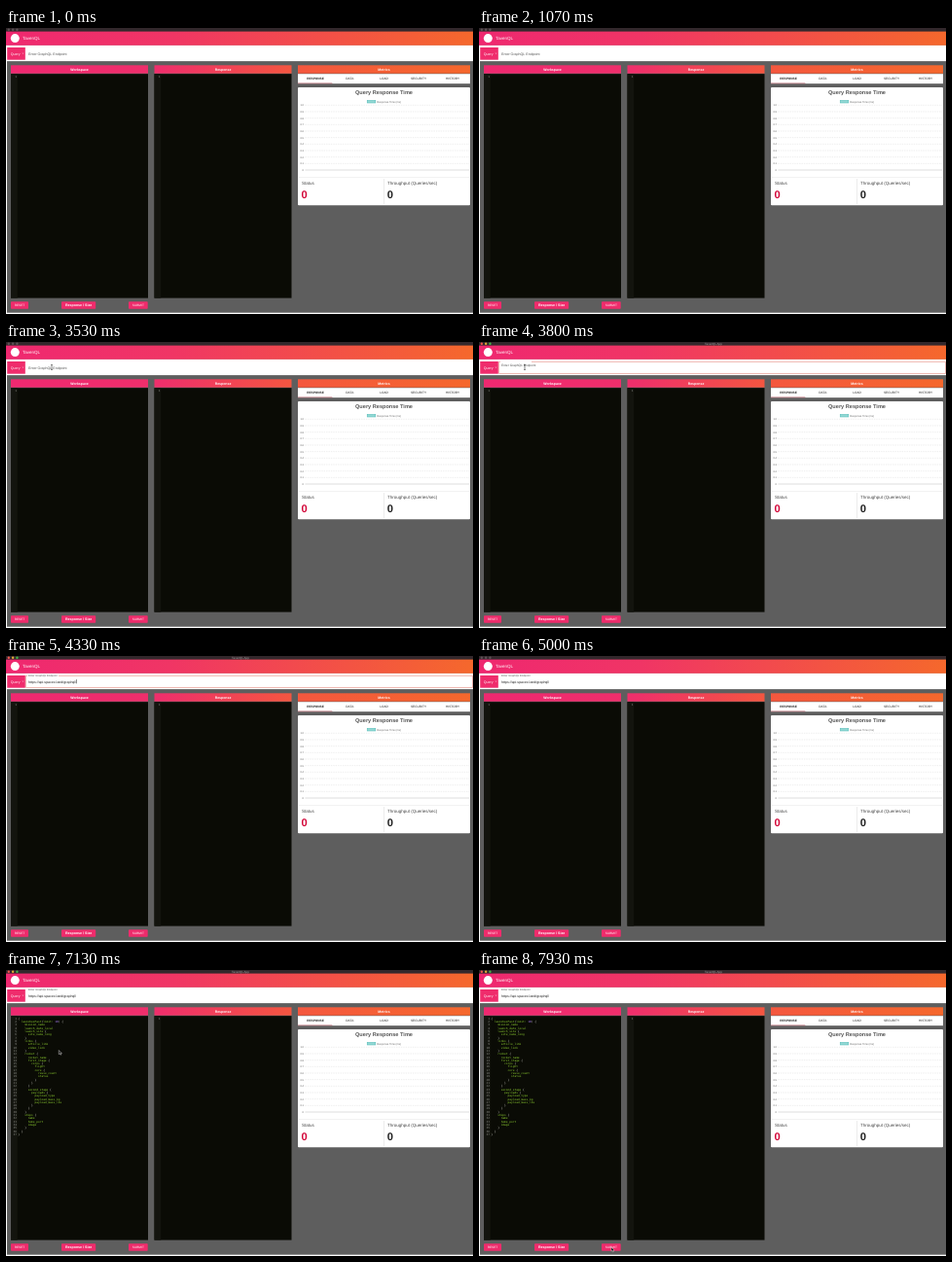
Animation of 480x294 px, one loop 8 s. Source, as an HTML page:

```html
<!DOCTYPE html>
<html lang="en">
<head>
<meta charset="utf-8">
<title>GraphQL client</title>
<style>
  html, body { margin: 0; height: 100%; overflow: hidden; background: #5e5e5e; }
  svg { display: block; width: 100vw; height: 100vh; }
  text { font-family: "Liberation Sans", Arial, sans-serif; text-rendering: geometricPrecision; }
  .mono text { font-family: "DejaVu Sans Mono", monospace; font-size: 2.87px; white-space: pre; }
</style>
</head>
<body>
<svg id="stage" viewBox="0 0 480 294">
  <defs>
    <linearGradient id="brand" gradientUnits="userSpaceOnUse" x1="0" y1="0" x2="480" y2="0">
      <stop offset="0" stop-color="#ef2870"/>
      <stop offset=".35" stop-color="#f03565"/>
      <stop offset="1" stop-color="#f5682c"/>
    </linearGradient>
    <linearGradient id="panels" gradientUnits="userSpaceOnUse" x1="0" y1="0" x2="480" y2="0">
      <stop offset="0" stop-color="#ef2870"/>
      <stop offset=".33" stop-color="#ef2f6b"/>
      <stop offset=".62" stop-color="#f4573f"/>
      <stop offset="1" stop-color="#f5682c"/>
    </linearGradient>
    <clipPath id="field"><rect x="20" y="19" width="460" height="15"/></clipPath>
  </defs>
  <g id="page"></g>
  <g clip-path="url(#field)">
    <path id="outline" d="M54 20.4H479.5V32.5H20.5V20.4H22" fill="none" stroke="#e58a80" stroke-width=".6"/>
    <text id="label" fill="#555" font-size="3.6">Enter GraphQL Endpoint</text>
    <text id="url" x="23" y="27.5" fill="#222" font-size="3.55">https://api.spacex.land/graphql/</text>
    <rect id="caret" x="72.4" y="24.1" width=".5" height="4.2" fill="#222"/>
  </g>
  <g id="code" class="mono"></g>
  <g id="lights"></g>
  <text id="title" x="241" y="2.7" font-size="3" fill="#a9a2a4" text-anchor="middle">TavenQL App</text>
  <g id="pointer">
    <path id="arrow" d="M0 0V4.2L1 3.3L1.7 4.8L2.4 4.5L1.8 3.1H3.1Z" fill="#111" stroke="#ddd" stroke-width=".45"/>
    <path id="beam" d="M-1 -2.6Q0 -2.6 0 -2V2Q0 2.6 -1 2.6M1 -2.6Q0 -2.6 0 -2M0 2Q0 2.6 1 2.6" fill="none" stroke="#222" stroke-width=".55"/>
  </g>
</svg>
<script>
const $ = id => document.getElementById(id);
const BRAND = 'url(#brand)', PANELS = 'url(#panels)', PINK = '#ef2c6c';

const rect = (x, y, w, h, fill, r = 0) =>
  `<rect x="${x}" y="${y}" width="${w}" height="${h}" rx="${r}" fill="${fill}"/>`;
const text = (str, x, y, size, fill, anchor = 'start', weight = 400) =>
  `<text x="${x}" y="${y}" font-size="${size}" fill="${fill}" text-anchor="${anchor}" font-weight="${weight}">${str}</text>`;
const button = (str, x, w, size, weight) =>
  rect(x, 281.2, w, 7.5, PINK, 0.8) + text(str, x + w / 2, 285 + size * 0.36, size, '#fff', 'middle', weight);
const heading = (str, x, w) =>
  rect(x, 38.3, w, 8.4, PANELS) + text(str, x + w / 2, 43.8, 3.5, '#fff', 'middle', 700);
const lineNumber = (n, x, y) => text(n, x, y, 2.87, '#8f908a', 'end');

function editor(title, x) {
  return heading(title, x, 141) + rect(x, 47.2, 141, 230.4, '#0a0b05') + rect(x, 47.2, 6.7, 230.4, '#13140e') +
    `<g class="mono">${lineNumber(1, x + 5.9, 50.8)}</g>`;
}

function metrics() {
  const tabs = [['RESPONSE', 318], ['DATA', 353.3], ['LOAD', 388.5], ['SECURITY', 424], ['HISTORY', 459]];
  let out = heading('Metrics', 300, 177) + rect(300, 47.2, 177, 10, '#fff') + rect(300, 56.6, 35.4, 0.6, '#a5424f');
  tabs.forEach(([name, x], i) => {
    out += text(name, x, 53.4, 3.2, '#222', 'middle', i ? 400 : 700);
  });
  out += rect(300, 61, 177, 121.2, '#fff', 1);
  out += text('Query Response Time', 388.5, 68.4, 5.6, '#555', 'middle', 700);
  out += `<rect x="371.2" y="74.4" width="8.6" height="2.6" fill="#93d8d4" stroke="#4bb8b4" stroke-width=".5"/>`;
  out += text('Response Time (ms)', 381.2, 76.7, 2.7, '#666');
  for (let i = 0; i <= 10; i++) {
    const y = 79.3 + i * 6.67;
    const tick = i === 10 ? '0' : (1 - i / 10).toFixed(1);
    out += text(tick, 306, y + 0.9, 2.6, '#555', 'end');
    out += `<path d="M307.5 ${y}H476" stroke="${i === 10 ? '#bbb' : '#ddd'}" stroke-width=".5" stroke-dasharray="${i === 10 ? 'none' : '1.4 1'}"/>`;
  }
  out += rect(301, 153.6, 175, 0.4, '#ddd') + rect(388.3, 155, 0.4, 26, '#ccc');
  out += text('Status', 304, 161.3, 4.5, '#444') + text('0', 303.6, 175, 11.2, '#d3093a', 'start', 700);
  out += text('Throughput (Queries/sec)', 392, 161.3, 4.5, '#444') + text('0', 391.8, 175, 11.2, '#222', 'start', 700);
  return out;
}

$('page').innerHTML =
  rect(0, 0, 480, 294, '#5e5e5e') + rect(0, 0, 480, 4, '#33282c') +
  rect(0, 3.6, 480, 14.3, BRAND) +
  '<circle cx="9.3" cy="10.6" r="4.5" fill="#fff"/>' +
  text('TavenQL', 17, 12.3, 4.5, '#fff') +
  rect(0, 17.9, 480, 16.2, '#fff') +
  rect(1.2, 20, 18.6, 12.7, PINK) + text('Query', 4.8, 27.5, 3.6, '#fff') +
  '<path d="M16.4 25.7h2l-1 1.1z" fill="#f9b3cb"/>' +
  rect(0, 34, 1, 260, '#fff') + rect(0, 292.7, 480, 1.3, '#fff') +
  editor('Workspace', 5) + editor('Response', 152.5) + metrics() +
  button('RESET', 5, 18, 3.2, 400) +
  button('Response / Size', 57, 35.2, 3.6, 700) +
  button('SUBMIT', 126, 19.7, 3.2, 400);

const LIGHTS = ['#f4574f', '#e0ab35', '#43b649'];
$('lights').innerHTML = LIGHTS.map((_, i) => `<circle cx="${2.8 + i * 4.3}" cy="1.7" r="1.2"/>`).join('');

const query = `{
  launchesPast(limit: 10) {
    mission_name
    launch_date_local
    launch_site {
      site_name_long
    }
    links {
      article_link
      video_link
    }
    rocket {
      rocket_name
      first_stage {
        cores {
          flight
          core {
            reuse_count
            status
          }
        }
      }
      second_stage {
        payloads {
          payload_type
          payload_mass_kg
          payload_mass_lbs
        }
      }
    }
    ships {
      name
      home_port
      image
    }
  }
}`;
$('code').innerHTML = query.split('\n').map((line, i) => {
  const y = 50.8 + i * 3.31;
  const indent = line.search(/\S/);
  const body = line.trim()
    .replace(/[{}()]/g, '<tspan fill="#d0d0c8">$&</tspan>')
    .replace('10', '<tspan fill="#ae81ff">10</tspan>');
  return (i ? lineNumber(i + 1, 10.9, y) : '') + text(body, 12.3 + indent * 1.728, y, 2.87, '#8fd032');
}).join('');

const LOOP = 8000, FOCUS = 3735, PASTE_URL = 4200, PASTE_QUERY = 7000;
// Pointer strokes: time in ms, x, y
const strokes = [
  [[3070, 35, 49], [3250, 37, 44], [3530, 47, 26], [PASTE_URL, 47, 26]],
  [[6400, 84, 40], [6700, 54.3, 82.5], [7330, 54.3, 82.5],
   [7530, 84, 187], [7670, 84, 187], [7930, 136, 285], [LOOP, 136, 285]],
];

const clamp = v => Math.min(1, Math.max(0, v));
const smooth = v => v * v * (3 - 2 * v);
const between = (t, a, b) => t >= a && t < b;
const show = (id, on) => $(id).setAttribute('visibility', on ? 'visible' : 'hidden');

function pointerAt(t) {
  const path = strokes.find(s => between(t, s[0][0], s[s.length - 1][0]));
  if (!path) return null;
  const i = path.findIndex(p => p[0] > t);
  const [t0, x0, y0] = path[i - 1], [t1, x1, y1] = path[i];
  const k = smooth((t - t0) / (t1 - t0));
  return [x0 + (x1 - x0) * k, y0 + (y1 - y0) * k];
}

function draw(t) {
  const active = between(t, FOCUS, 4600) || t >= 6530;
  const inField = active && t < 6900;
  show('title', active);
  [...$('lights').children].forEach((dot, i) => dot.setAttribute('fill', active ? LIGHTS[i] : '#5d5256'));

  const lift = smooth(clamp((t - FOCUS) / 150));
  $('label').setAttribute('transform', `translate(23 ${27.5 - 6.3 * lift}) scale(${1 - 0.25 * lift})`);
  show('outline', inField);
  show('url', t >= PASTE_URL);
  show('caret', inField && t >= PASTE_URL);
  show('code', t >= PASTE_QUERY);

  const pos = pointerAt(t);
  const overField = pos && pos[1] < 33;
  show('arrow', pos && !overField);
  show('beam', overField);
  if (pos) $('pointer').setAttribute('transform', `translate(${pos})`);
}

let start;
function tick(now) {
  start ??= now;
  draw((now - start) % LOOP);
  requestAnimationFrame(tick);
}
draw(0);
requestAnimationFrame(tick);
</script>
</body>
</html>
```
